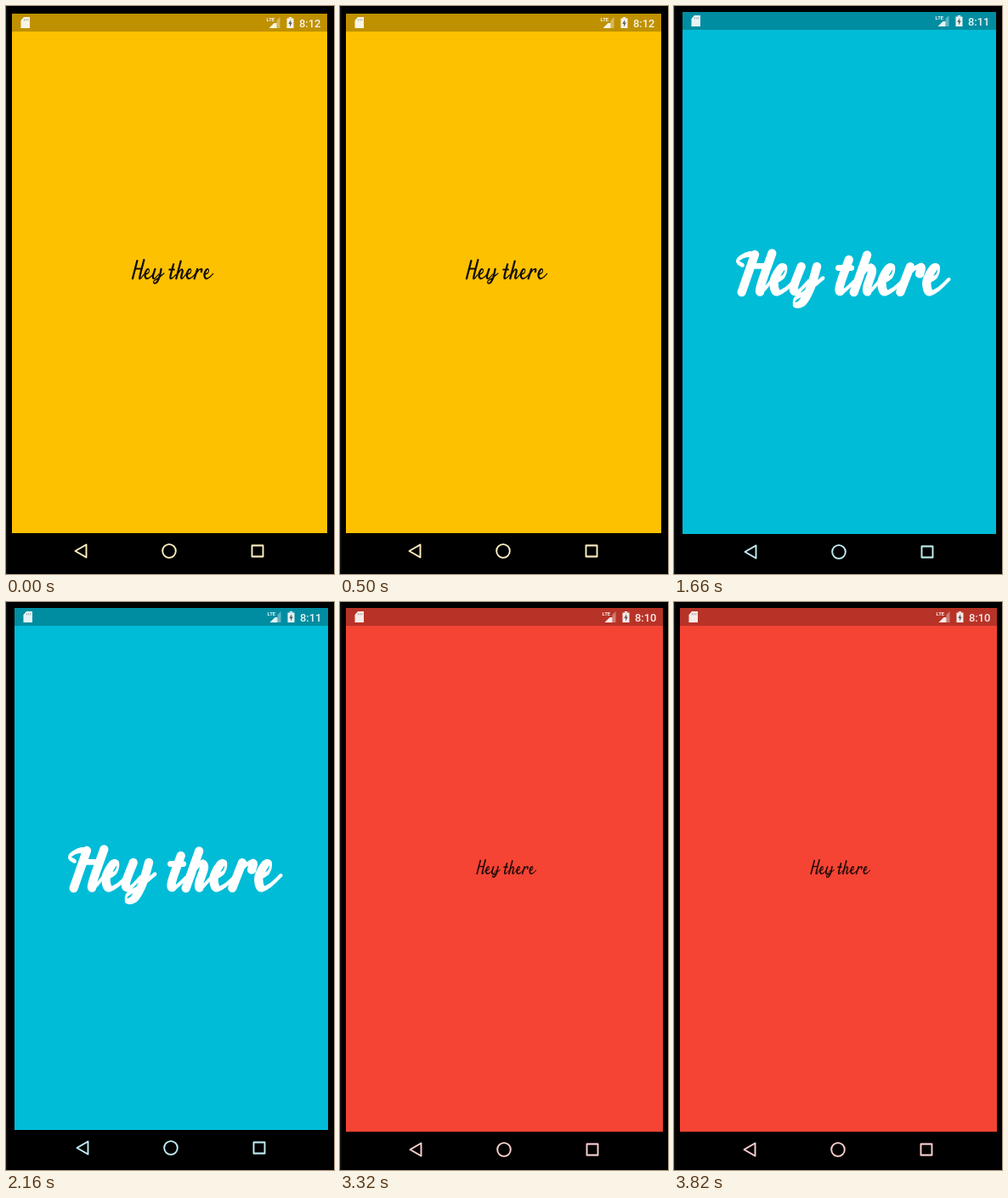
Write an HTML page with a canvas that moves like this. It is 386 by 667 pixels and loops after 4150 ms.

```html
<!DOCTYPE html>
<html lang="en">
<head>
<meta charset="utf-8">
<title>Hey there</title>
<style>
  html, body { margin: 0; width: 100%; height: 100%; overflow: hidden; background: #000; }
  canvas { display: block; }
</style>
</head>
<body>
<canvas id="stage" width="386" height="667" role="img" aria-label="Hey there"></canvas>
<script>
const ctx = document.getElementById("stage").getContext("2d");
const HOLD = 830;

// Key points of the pen's way: x in letter widths; y is 0 at the baseline, 1 at x-height, 2 at the ascender.
const letters = {
  H: { advance: 1.55, strokes: ["1.2,2.15 1.1,.25 1.22,0 1.5,.4"] },
  e: { advance: 0.97, strokes: [".12,.42 .48,.62 .48,.95 .25,.95 .1,.45 .35,0 .72,.1 1.1,.5"] },
  y: { advance: 1.4, strokes: [".2,1 .12,.2 .36,0 .75,.45", ".92,1 .9,.2 .72,-.4 .4,-.5 .35,-.25 .8,.05 1.35,.55"] },
  t: { advance: 0.78, strokes: [".28,1.6 .2,.25 .38,0 .8,.4", "-.1,.95 .5,.95"] },
  h: { advance: 1.2, strokes: [".28,2 .15,0", ".2,.4 .5,.95 .72,.8 .7,.2 .85,0 1.2,.45"] },
  r: { advance: 1.1, strokes: [".25,1 .12,0", ".18,.4 .45,.9 .75,.98 .78,.72"] }
};

const plainBar = ".38,1.05 1.15,1.05";
const leftStem = ".42,2.05 .3,0";

// unit: letter width, rise: ascender part of the x-height, taper: thinning above the x-height.
const pen = { unit: 10, xHeight: 11, rise: 0.85, slant: 0.2, thin: 1.1, thick: 2.4, taper: 0,
  capital: [leftStem, plainBar] };
const script = { unit: 47, xHeight: 36, rise: 0.8, slant: 0.43, thin: 4, thick: 16, taper: 0.55,
  capital: ["1.25,1.1 .35,1.25 -.1,1.2 -.4,.75 -.3,.2 0,.05 .3,.8 .42,2.05"] };
const bold = { unit: 25.5, xHeight: 30, rise: 0.45, slant: 0.28, thin: 3, thick: 10.5, taper: 0,
  capital: [leftStem, plainBar, "0,1.1 -.3,1.5 0,2 .45,2.05"] };

// Smooth stroke, thick where the pen goes down and thin where it goes up.
function brush(path, keys, face) {
  const points = keys.split(" ").map(pair => {
    const [x, h] = pair.split(",").map(Number);
    const y = face.xHeight * (h > 1 ? 1 + (h - 1) * face.rise : h);
    return [x * face.unit + y * face.slant, -y, 1 - face.taper * Math.max(0, h - 1)];
  });
  const last = points.length - 1;
  const at = i => points[Math.max(0, Math.min(last, i))];
  for (let i = 0; i < last; i++) {
    const [a, b, c, d] = [at(i - 1), at(i), at(i + 1), at(i + 2)];
    const steps = Math.ceil(3 * Math.hypot(c[0] - b[0], c[1] - b[1]));
    const spline = (k, u) =>
      b[k] + u / 2 * (c[k] - a[k] + u * (2 * a[k] - 5 * b[k] + 4 * c[k] - d[k] + u * (3 * (b[k] - c[k]) + d[k] - a[k])));
    for (let s = 0; s <= steps; s++) {
      const u = s / steps;
      const x = spline(0, u), y = spline(1, u);
      const dx = spline(0, u + 0.01) - spline(0, u - 0.01);
      const dy = spline(1, u + 0.01) - spline(1, u - 0.01);
      const down = (1 + dy / Math.hypot(dx, dy)) / 2;
      const r = (face.thin + (face.thick - face.thin) * down) * spline(2, u) / 2;
      path.moveTo(x + r, y);
      path.arc(x, y, r, 0, Math.PI * 2);
    }
  }
}

for (const face of [pen, script, bold]) {
  face.glyphs = {};
  for (const name in letters) {
    const path = face.glyphs[name] = new Path2D();
    const extra = name === "H" ? face.capital : [];
    [...letters[name].strokes, ...extra].forEach(keys => brush(path, keys, face));
  }
}

const scenes = [
  { box: [7, 9, 378, 619], bg: "#fec100", ink: "#100c08", clock: "8:12",
    face: pen, scale: 1, words: [["Hey", 146, 320], ["there", 191, 320]] },
  { box: [7, 9, 378, 622], bg: "#2196f3", ink: "#fff", clock: "8:12",
    face: script, scale: 1, words: [["Hey", 40, 276], ["there", 24, 404]] },
  { box: [10, 7, 379, 620], bg: "#00bcd7", ink: "#fff", clock: "8:11",
    face: bold, scale: 1, words: [["Hey", 72, 336], ["there", 188, 336]] },
  { box: [5, 7, 378, 622], bg: "#18ffff", ink: "#000", clock: "8:11",
    face: script, scale: 0.573, words: [["Hey", 63, 329], ["there", 191, 329]] },
  { box: [7, 7, 380, 622], bg: "#f54434", ink: "#1c0907", clock: "8:10",
    face: pen, scale: 0.737, words: [["Hey", 159, 319], ["there", 192, 319]] }
];

function polygon(...p) {
  ctx.beginPath();
  for (let i = 0; i < p.length; i += 2) ctx.lineTo(p[i], p[i + 1]);
  ctx.closePath();
}

function drawWord(face, scale, [word, x, y]) {
  ctx.save();
  ctx.translate(x, y);
  ctx.scale(scale, scale);
  for (const name of word) {
    ctx.fill(face.glyphs[name]);
    ctx.translate(letters[name].advance * face.unit, 0);
  }
  ctx.restore();
}

function drawCard(x, y) {
  ctx.save();
  ctx.translate(x, y);
  polygon(4, 0, 11, 0, 11, 13, 0.5, 13, 0.5, 4);
  ctx.fill();
  ctx.globalAlpha = 0.3;
  ctx.fillStyle = "#000";
  for (let i = 0; i < 3; i++) ctx.fillRect(4 + i * 2.2, 2, 1, 2.4);
  ctx.restore();
}

function drawSignal(x, y) {
  ctx.save();
  ctx.translate(x, y);
  ctx.font = "bold 6px Roboto, sans-serif";
  ctx.textAlign = "left";
  ctx.fillText("LTE", 0, 5);
  polygon(3, 13, 9, 7, 12, 7, 12, 13);
  ctx.fill();
  ctx.globalAlpha = 0.4;
  polygon(12, 4, 16, 0, 16, 13, 12, 13);
  ctx.fill();
  ctx.restore();
}

function drawBattery(x, y) {
  ctx.save();
  ctx.translate(x, y);
  ctx.fillRect(0, 1.5, 8, 11.5);
  ctx.fillRect(2.3, 0, 3.4, 1.5);
  ctx.globalAlpha = 0.6;
  ctx.fillStyle = "#000";
  polygon(4.7, 3, 1.8, 8, 3.5, 8, 3.5, 11.5, 6.3, 6.5, 4.7, 6.5);
  ctx.fill();
  ctx.restore();
}

function drawStatus([left, top, right], clock) {
  const end = right - 7.5;
  ctx.fillStyle = "rgba(0, 0, 0, 0.25)";
  ctx.fillRect(left, top, right - left, 21);
  ctx.fillStyle = "rgba(255, 255, 255, 0.9)";
  drawCard(left + 10, top + 4);
  drawSignal(end - 64, top + 4);
  drawBattery(end - 40, top + 4);
  ctx.font = "500 13px Roboto, sans-serif";
  ctx.textAlign = "right";
  ctx.fillText(clock, end, top + 15.5);
}

function drawNav([left, , right, bottom], color) {
  const x = (left + right - 1) / 2, y = bottom + 21, gap = 104;
  ctx.strokeStyle = color;
  ctx.lineWidth = 1.8;
  ctx.lineJoin = "round";
  polygon(x - gap - 6.5, y, x - gap + 6.5, y - 7.5, x - gap + 6.5, y + 7.5);
  ctx.stroke();
  ctx.beginPath();
  ctx.arc(x, y, 7.8, 0, Math.PI * 2);
  ctx.stroke();
  ctx.strokeRect(x + gap - 6.5, y - 6.5, 13, 13);
}

function draw({ box, bg, ink, clock, face, scale, words }) {
  const [left, top, right, bottom] = box;
  ctx.fillStyle = "#000";
  ctx.fillRect(0, 0, 386, 667);
  ctx.fillStyle = "#121212";
  ctx.fillRect(0, 0, 1.5, 667);
  ctx.fillStyle = bg;
  ctx.fillRect(left, top, right - left, bottom - top);
  drawStatus(box, clock);

  // White icons washed with the screen colour.
  drawNav(box, "#fff");
  ctx.globalAlpha = 0.25;
  drawNav(box, bg);
  ctx.globalAlpha = 1;

  ctx.fillStyle = ink;
  words.forEach(word => drawWord(face, scale, word));
}

const start = performance.now();
function tick() {
  const elapsed = performance.now() - start;
  draw(scenes[Math.floor(elapsed / HOLD) % scenes.length]);
  requestAnimationFrame(tick);
}
tick();
</script>
</body>
</html>
```
